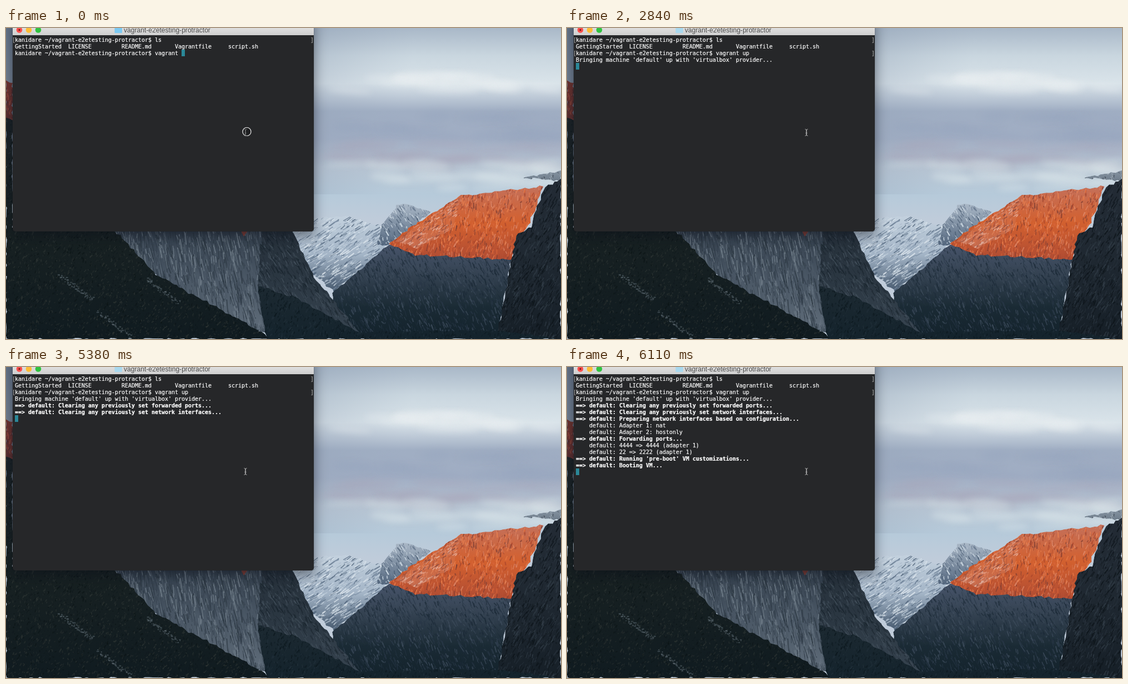
Animation, 999 px wide and 561 px high, one loop 8000 ms. Source, as an HTML page with a canvas:

```html
<!DOCTYPE html>
<html lang="en">
<head>
<meta charset="utf-8">
<title>Terminal</title>
<style>
html, body { margin: 0; width: 999px; height: 561px; overflow: hidden; background: #17212a; }
body { position: relative; }
canvas, svg, pre, #cursor, #win, #bar { position: absolute; }
canvas, svg { left: 0; top: 0; }
#win { left: 12px; top: -20px; width: 542px; height: 387px; border-radius: 5px; background: #262729;
  box-shadow: 0 8px 22px rgba(10, 14, 24, .5), 0 0 1px #111; }
#bar { left: 12px; top: 0; width: 542px; height: 13px; background: linear-gradient(#dedede, #cfcfcf); }
pre { margin: 0; padding-top: 1px; left: 16px; color: #fff; font: 10px/12px "DejaVu Sans Mono", monospace;
  letter-spacing: -.02px; -webkit-text-stroke: .2px; }
.mark { color: #a0a0a0; }
.bold { font-weight: bold; }
#cursor { width: 6px; height: 12px; background: #2b8898; }
</style>
</head>
<body>
<canvas width="999" height="561"></canvas>
<div id="win"></div>
<div id="bar"></div>
<svg width="999" height="561">
  <circle cx="24" cy="3.5" r="5.3" fill="#fc4f4c"/>
  <circle cx="24" cy="3.5" r="1.6" fill="#6d1512"/>
  <circle cx="41" cy="3.5" r="5.3" fill="#fdbc35"/>
  <circle cx="58" cy="3.5" r="5.3" fill="#30c340"/>
  <rect id="folder" x="195.5" y="-3" width="13.5" height="12" rx="1"/>
  <text x="212" y="8" font-family="Liberation Sans, Arial, sans-serif" font-size="12" letter-spacing=".04" fill="#4c4c4c">vagrant-e2etesting-protractor</text>
  <circle id="ring" cx="433.5" cy="187" r="7.5" fill="#1d1e20" stroke="#f2f2f2" stroke-width="1.2"/>
  <path id="beam" d="M428.5 182.5Q431 182.5 431 185V192Q431 194.5 428.5 194.5M433.5 182.5Q431 182.5 431 185V192Q431 194.5 433.5 194.5M429.5 189.5H432.5" fill="none"/>
</svg>
<div id="cursor"></div>
<script>
const ctx = document.querySelector('canvas').getContext('2d');
const $ = id => document.getElementById(id);

let seed = 7;
const rand = () => (seed = seed * 16807 % 2147483647) / 2147483647;
const between = (a, b) => a + (b - a) * rand();

function blend(colors, x0, y0, x1, y1) {
  const g = ctx.createLinearGradient(x0, y0, x1, y1);
  colors.forEach((c, i) => g.addColorStop(i / (colors.length - 1), c));
  return g;
}

function paintSky() {
  ctx.fillStyle = blend(['#a9b8c8', '#c9d6df', '#dae4ea', '#a0aec3', '#a1aec4', '#b9c6d4', '#b6cada', '#c0ccda'], 0, 0, 0, 350);
  ctx.fillRect(0, 0, 999, 561);
  ctx.fillStyle = blend(['#56657bcc', '#7f90a6aa', '#9aa9bd00'], 0, 0, 720, 110);
  ctx.fillRect(0, 0, 999, 300);

  // Each cloud bank fills one level of the sky with flat, blurred wisps.
  const banks = [['#eaf1f3', 95], ['#97a6bd', 175], ['#a9a5ba', 225], ['#e2eaee', 266]];
  ctx.filter = 'blur(6px)';
  for (const [color, level] of banks) {
    ctx.fillStyle = color + '66';
    for (let i = 0; i < 16; i++) {
      ctx.beginPath();
      ctx.ellipse(between(620, 1000), level + between(-22, 22), between(25, 75), between(3, 9), between(-.1, .15), 0, 7);
      ctx.fill();
    }
  }
  ctx.filter = 'none';
}

// Splits the edges of an outline into short uneven steps.
function ragged(points) {
  const shape = new Path2D();
  points.forEach(([x, y], i) => {
    const [nx, ny] = points[(i + 1) % points.length];
    const steps = Math.ceil(Math.hypot(nx - x, ny - y) / 7);
    for (let s = 0; s < steps; s++) {
      shape.lineTo(x + (nx - x) * s / steps + between(-2, 2), y + (ny - y) * s / steps + between(-2, 2));
    }
  });
  shape.closePath();
  return shape;
}

// Fills a ragged outline from top to bottom colour and grains it with strokes along (dx, dy).
function land(outline, fills, grain, dx, dy) {
  const points = outline.split(' ').map(p => p.split(',').map(Number));
  const xs = points.map(p => p[0]), ys = points.map(p => p[1]);
  const left = Math.min(...xs), right = Math.max(...xs);
  const top = Math.min(...ys), bottom = Math.max(...ys);
  const shape = ragged(points);
  ctx.save();
  ctx.clip(shape);
  ctx.fillStyle = blend(fills, 0, top, 0, bottom);
  ctx.fill(shape);
  for (let i = (right - left) * (bottom - top) / 28; i > 0; i--) {
    const x = between(left, right), y = between(top, bottom), k = between(.2, 1);
    ctx.strokeStyle = grain[Math.floor(rand() * grain.length)] + 'b0';
    ctx.lineWidth = between(.5, 2.2);
    ctx.beginPath();
    ctx.moveTo(x, y);
    ctx.lineTo(x + dx * k + between(-3, 3), y + dy * k);
    ctx.stroke();
  }
  ctx.restore();
}

function paintLand() {
  // Snowy range and rounded peak
  land('500,345 610,340 676,357 700,392 592,478 500,400', ['#c3d1de', '#a3b4c6', '#43566b'],
    ['#e6eef3', '#7d90a6', '#4e6279', '#c9d6e1'], -13, 9);
  land('668,390 676,354 704,320 722,318 766,331 690,392', ['#a9b7c6', '#53667d'],
    ['#d6e1e9', '#475a70', '#71839a'], 6, 10);

  // Shaded valley wall below the sunlit cliff
  land('588,478 690,390 910,412 885,561 600,561', ['#47546a', '#334150', '#1a2a34', '#13222b'],
    ['#293848', '#3f4d5e', '#1c2b37'], 5, 12);
  land('688,390 742,350 820,302 969,285 940,356 909,418 738,409', ['#c4705a', '#d2602f', '#b04c33'],
    ['#ee8450', '#d9663a', '#a8452c', '#7a3d35', '#df8a6c'], -2, 11);
  land('702,384 820,304 806,360 740,398', ['#d0907c00', '#d0907c66'],
    ['#ecc4b4', '#d98a70', '#7c433f', '#e3a48e'], -7, 6);

  // Dark buttress at the right edge
  land('930,270 999,258 999,276', ['#8492a0', '#6f7d8b'], ['#47525f', '#a7b2bd'], 1, 6);
  land('999,272 967,290 944,358 918,376 882,561 999,561', ['#232b35', '#1f2831', '#161f27'],
    ['#11181e', '#323d48', '#0d1419', '#28323c'], -6, 12);

  // Shadowed flank, then the great grey wall
  land('400,365 515,365 555,450 636,548 450,548', ['#27313b', '#2b3742', '#36434f'],
    ['#1a252e', '#43505c', '#202b35'], 7, 12);
  land('192,360 462,360 452,465 468,548 390,535 225,410', ['#333f4c', '#4a5765', '#5f6c79'],
    ['#36424f', '#74818d', '#4d5a67', '#2c3742'], 5, 26);
  land('418,362 438,362 429,375', ['#6b3a36', '#8c4238'], ['#542e30'], 3, 4);

  // Valley floor and forested slope
  land('453,465 520,486 636,548 890,545 999,561 470,561', ['#1c2931', '#14232c'],
    ['#0c181e', '#22313a', '#101e25'], -2, 7);
  land('0,160 12,165 12,360 192,360 270,445 455,545 475,561 0,561', ['#1c2428', '#182122', '#101b20'],
    ['#0c1517', '#262e2d', '#101a1d', '#2e3533'], -2, 5);
  land('0,95 12,98 12,166 0,160', ['#713530', '#5a2f30'], ['#9b4b3c', '#422c32'], -1, 9);

  // Loose stones running down the slope
  for (const [x, y] of [[95, 445], [252, 452], [165, 512]]) {
    for (let i = 0; i < 60; i++) {
      ctx.fillStyle = i % 2 ? '#65717980' : '#3b474d';
      ctx.fillRect(x + i + between(-3, 3), y + i * .75 + between(-4, 4), between(1, 4), 2);
    }
  }
}

const PROMPT = 'kanidare ~/vagrant-e2etesting-protractor$ ';
const lines = [
  [0, PROMPT + 'ls'],
  [0, 'GettingStarted  LICENSE         README.md       Vagrantfile     script.sh'],
  [0, PROMPT + 'vagrant '],
  [2840, "Bringing machine 'default' up with 'virtualbox' provider..."],
  [4180, '==> default: Clearing any previously set forwarded ports...'],
  [5380, '==> default: Clearing any previously set network interfaces...'],
  [5670, '==> default: Preparing network interfaces based on configuration...'],
  [5670, '    default: Adapter 1: nat'],
  [5670, '    default: Adapter 2: hostonly'],
  [5670, '==> default: Forwarding ports...'],
  [5820, '    default: 4444 => 4444 (adapter 1)'],
  [5820, '    default: 22 => 2222 (adapter 1)'],
  [6110, "==> default: Running 'pre-boot' VM customizations..."],
  [6110, '==> default: Booting VM...']
];

const rowTop = row => 15 + 12 * row + 'px';

function addText(text, row, className) {
  const el = document.createElement('pre');
  el.className = className;
  el.textContent = text;
  el.style.top = rowTop(row);
  document.body.append(el);
  return el;
}

function addMarks(row) {
  return [['[', 11], [']', 548]].map(([char, x]) => {
    const el = addText(char, row, 'mark');
    el.style.left = x + 'px';
    return el;
  });
}

const rows = lines.map(([, text], i) => addText(text, i, text.startsWith('==>') ? 'bold' : ''));
addMarks(0);
const enterMarks = addMarks(2);
const show = (el, on) => el.style.visibility = on ? 'visible' : 'hidden';

function render(now) {
  const t = now % 8000;
  const typed = t < 300 ? 0 : t < 450 ? 1 : 2;
  const entered = t >= 750;
  const count = lines.filter(([start]) => t >= start).length;

  rows.forEach((el, i) => show(el, i < count));
  rows[2].textContent = lines[2][1] + 'up'.slice(0, typed);
  enterMarks.forEach(el => show(el, entered));
  $('cursor').style.left = (entered ? 16 : 316 + 6 * typed) + 'px';
  $('cursor').style.top = rowTop(entered ? count : 2);
  show($('ring'), t < 150);
  $('beam').setAttribute('stroke', t < 150 ? '#777' : '#b4b4b4');
  $('folder').setAttribute('fill', t < 890 ? '#7cc9f2' : '#a9d8ee');
  requestAnimationFrame(render);
}

paintSky();
paintLand();
render(performance.now());
</script>
</body>
</html>
```
